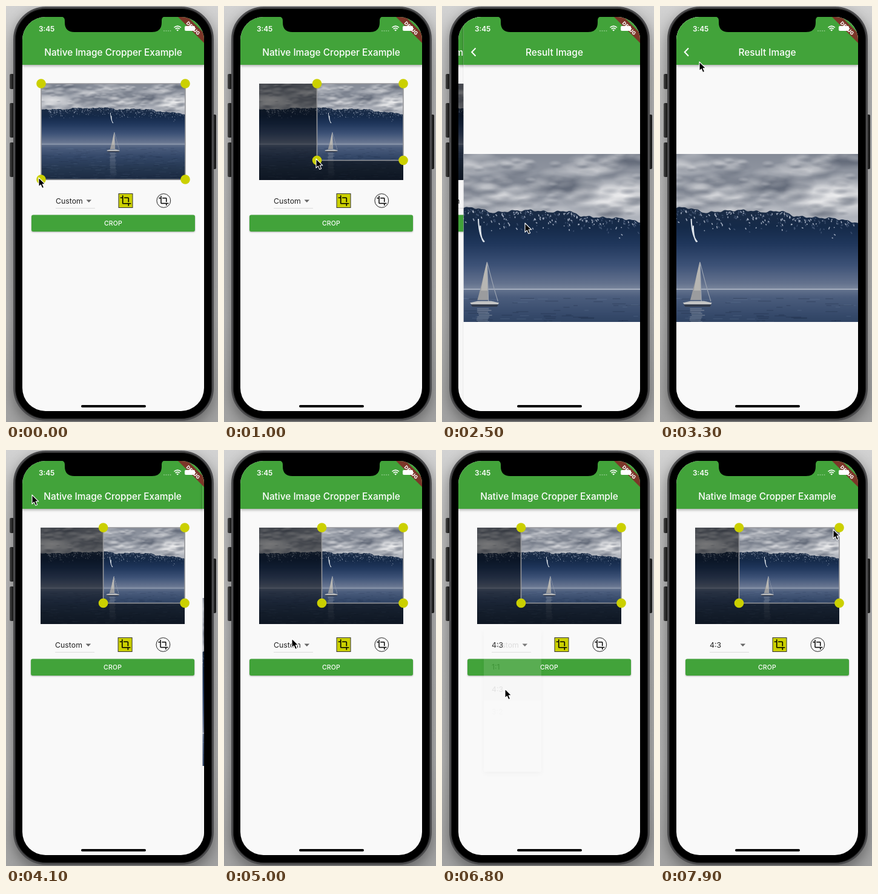
An HTML page with a canvas that plays this animation: 350x686 px, repeating every 8 s.

```html
<!DOCTYPE html>
<html lang="en">
<head>
<meta charset="utf-8">
<title>Image cropper demo</title>
<style>
html, body { margin: 0; width: 100%; height: 100%; overflow: hidden; background: #fff; }
#stage { position: relative; width: 350px; height: 686px; overflow: hidden; background: linear-gradient(#d2d2d2, #bebebe 18%, #b4b4b4 75%, #a2a2a2); }
svg, .layer { position: absolute; left: 0; top: 0; width: 350px; height: 686px; }
#body { position: absolute; box-sizing: border-box; left: 12px; top: 1px; width: 331px; height: 683px; border-radius: 54px; border: 3px solid #4b4b4d; background: #000; box-shadow: 0 8px 22px rgba(0,0,0,.4), inset 0 0 0 1px #222; }
.key { position: absolute; width: 7px; border-radius: 2px; background: linear-gradient(90deg, #555, #222 70%); }
#screen { clip-path: inset(18px 23px 18px 27px round 38px); background: #f9f9f9; }
canvas { position: absolute; }
#photo { left: 58px; top: 128px; width: 238px; height: 159px; }
#cropped { left: 27px; top: 244px; width: 300px; height: 277px; }
text { font-family: Inter, Roboto, sans-serif; font-size: 12.3px; fill: #222; }
.title { font-size: 15.4px; font-weight: 500; fill: #fff; text-anchor: middle; }
.bar { fill: #42a33a; filter: drop-shadow(0 2px 2px rgba(0,0,0,.3)); }
.edge { fill: #f9f9f9; filter: drop-shadow(0 0 2px rgba(0,0,0,.1)); }
</style>
</head>
<body>
<div id="stage">
  <div class="key" style="left:6px;top:112px;height:25px"></div>
  <div class="key" style="left:6px;top:160px;height:57px"></div>
  <div class="key" style="left:6px;top:225px;height:57px"></div>
  <div class="key" style="left:340px;top:179px;height:90px"></div>
  <div id="body"></div>

  <div id="screen" class="layer">
    <div id="home" class="layer">
      <canvas id="photo"></canvas>
      <svg viewBox="0 0 350 686">
        <rect class="bar" x="27" y="10" width="300" height="87"/>
        <text class="title" x="177" y="81.5">Native Image Cropper Example</text>
        <path id="shade" fill="#000" fill-opacity=".47" fill-rule="evenodd"/>
        <path id="frame" fill="none" stroke="#96979a" stroke-width="1.6"/>
        <g id="handles" fill="#cbd000"></g>
        <text id="ratio" x="82" y="325.5"></text>
        <path d="M132.5 319.5h8.6l-4.3 4.4z" fill="#666"/>
        <path d="M82 333.5h65" stroke="#dcdcdc"/>
        <rect x="186" y="309.5" width="23" height="23" fill="#cbd000" stroke="#333"/>
        <circle cx="260.3" cy="321" r="11.4" fill="none" stroke="#222"/>
        <path class="glyph" transform="translate(187.9 311.4) scale(.8)"/>
        <path class="glyph" transform="translate(251.6 312.3) scale(.73)"/>
        <rect x="42" y="344.5" width="270" height="27.5" rx="3" fill="#42a33a" style="filter:drop-shadow(0 1px 1px rgba(0,0,0,.3))"/>
        <text x="177" y="361.5" text-anchor="middle" style="font-size:10.5px;font-weight:500;fill:#fff;letter-spacing:.2px">CROP</text>
        <g id="menu">
          <rect id="sheet" x="69" width="95" rx="2" fill="#fafafa" style="filter:drop-shadow(0 3px 4px rgba(0,0,0,.28))"/>
          <rect id="hover" x="69" width="95" height="36.9" fill="#000" fill-opacity=".06"/>
          <g id="items"></g>
        </g>
      </svg>
    </div>
    <div id="result" class="layer">
      <svg viewBox="0 0 350 686">
        <rect class="edge" x="27" y="0" width="300" height="686"/>
        <rect class="bar" x="27" y="10" width="300" height="87"/>
        <text class="title" x="177" y="81.5">Result Image</text>
        <path d="M47 69.5l-6.3 6.5 6.3 6.5" fill="none" stroke="#fff" stroke-width="2"/>
      </svg>
      <canvas id="cropped"></canvas>
    </div>
    <svg viewBox="0 0 350 686">
      <path d="M284 18h16l27 27v16z" fill="#7c3629"/>
      <g fill="#fff">
        <text x="54" y="41.5" style="font-size:11.8px;font-weight:600;fill:#fff">3:45</text>
        <g fill-opacity=".4"><circle cx="261" cy="41" r=".9"/><circle cx="264.5" cy="41" r=".9"/><circle cx="268" cy="41" r=".9"/><circle cx="271.5" cy="41" r=".9"/></g>
        <path d="M277.5 35.5q5.7-4.8 11.4 0M279.6 37.8q3.6-3 7.2 0" fill="none" stroke="#fff" stroke-width="1.6"/>
        <path d="M283.2 41.6l-1.9-2.1q1.9-1.4 3.8 0z"/>
        <rect x="295" y="33" width="17" height="8" rx="2"/>
        <text transform="translate(309 36.5) rotate(45)" y="3" text-anchor="middle" style="font-size:8px;font-weight:800;fill:#fff">DEBUG</text>
      </g>
      <path d="M90 17h173q-6 1-6 7v3q0 16-16 16H113q-16 0-16-16v-3q0-6-7-7z"/>
      <rect x="124" y="658" width="107" height="4" rx="2"/>
    </svg>
  </div>
  <svg viewBox="0 0 350 686">
    <path id="cursor" d="M0 0V15L3.4 11.9 5.8 17.4 8.6 16.2 6.2 10.8H10.8Z" stroke="#fff" stroke-width="1.1" stroke-linejoin="round"/>
  </svg>
</div>
<script>
const LOOP = 8000;
const $ = id => document.getElementById(id);
const clamp = v => Math.max(0, Math.min(1, v));
const PHOTO = { left: 58, top: 128, right: 296, bottom: 287 };
const CUSTOM = { left: 161.5, bottom: 252.5 };
const FIXED = { left: 130.5, bottom: 252.5 };
const ITEMS = ['Custom', '1:1', '4:3', '3:2', '16:9', '9:16'];
const ROW = 36.9, ROW_TOP = 302.5;
const PUSH = 2165, POP = 3680, SLIDE = 500;
const OPEN = 5160, PICK = 6735, MENU = 300;

const CURSOR = [
  [0, 54, 283], [100, 54, 283], [1000, 152, 252], [1200, 160, 250], [1400, 160, 250],
  [1950, 137, 358], [2700, 137, 358], [3300, 65, 92], [3500, 43, 74], [4150, 43, 74],
  [4900, 112, 311], [5250, 112, 311], [6200, 104, 394], [7000, 104, 394], [7700, 286, 131]
];
const DRAG = [[100, 58, 286], [1000, 153.5, 254.5], [1200, CUSTOM.left, CUSTOM.bottom]];

function track(steps, t) {
  const next = steps.findIndex(s => s[0] > t);
  if (next === 0) return steps[0].slice(1);
  if (next < 0) return steps[steps.length - 1].slice(1);
  const a = steps[next - 1], b = steps[next];
  const u = (t - a[0]) / (b[0] - a[0]), e = u * u * (3 - 2 * u);
  return [1, 2].map(i => a[i] + (b[i] - a[i]) * e);
}

// cubic-bezier(.35, .91, .33, .97), solved by bisection
function slideEase(x) {
  const curve = (s, a, b) => 3 * s * (1 - s) ** 2 * a + 3 * s * s * (1 - s) * b + s ** 3;
  let lo = 0, hi = 1;
  for (let i = 0; i < 18; i++) {
    const mid = (lo + hi) / 2;
    if (curve(mid, .35, .33) < x) lo = mid; else hi = mid;
  }
  return curve(lo, .91, .97);
}

function paintPhoto(c) {
  let seed = 7;
  const rnd = () => (seed = seed * 16807 % 2147483647) / 2147483647;
  const shape = (fill, ...pts) => {
    c.fillStyle = fill;
    c.beginPath();
    pts.forEach(p => c.lineTo(p[0], p[1]));
    c.fill();
  };
  const fade = (y0, y1, ...stops) => {
    const g = c.createLinearGradient(0, y0, 0, y1);
    stops.forEach(([at, col]) => g.addColorStop(at, col));
    return g;
  };
  const puff = (x, y, rx, ry, rgb, a) => {
    c.save();
    c.translate(x, y);
    c.scale(rx, ry);
    const g = c.createRadialGradient(0, 0, 0, 0, 0, 1);
    g.addColorStop(0, `rgba(${rgb},${a})`);
    g.addColorStop(.5, `rgba(${rgb},${a * .6})`);
    g.addColorStop(1, `rgba(${rgb},0)`);
    c.fillStyle = g;
    c.fillRect(-1, -1, 2, 2);
    c.restore();
  };

  // sky: broad light and dark masses, then small billows
  c.fillStyle = fade(0, 55, [0, '#858b97'], [.5, '#9a9fa9'], [1, '#b9bdc5']);
  c.fillRect(0, 0, 238, 60);
  const white = '240,240,241', grey = '84,92,108';
  [[18, 27, 40, 12, white, .8], [222, 32, 46, 15, white, 1], [196, 11, 26, 6, white, .7],
   [112, 8, 26, 9, white, .5], [134, 31, 26, 9, white, .35], [74, 14, 30, 5, white, .5],
   [174, 22, 34, 9, grey, .8], [188, 27, 18, 6, grey, .6], [85, 28, 40, 9, grey, .5],
   [130, 20, 26, 6, grey, .5], [226, 4, 28, 8, grey, .7], [40, 6, 40, 8, grey, .45],
   [232, 34, 10, 5, grey, .5]
  ].forEach(p => puff(...p));
  for (let i = 0; i < 170; i++) {
    const x = rnd() * 238, y = rnd() * 44, r = 2.5 + rnd() * 5;
    puff(x, y, r * 1.6, r * .7, white, .26);
    puff(x + 1, y + r * .7, r * 1.7, r * .6, grey, .26);
  }

  // mountains
  const ridge = [[0, 42], [12, 43], [25, 42], [40, 43], [55, 40], [75, 41], [103, 39.5], [114, 40],
    [125, 43.5], [140, 42], [154, 41.5], [168, 43], [181, 42], [191, 46], [206, 47], [221, 47.6], [238, 51]];
  const ridgeY = x => {
    const i = Math.max(1, ridge.findIndex(p => p[0] >= x));
    const [a, b] = [ridge[i - 1], ridge[i]];
    return a[1] + (b[1] - a[1]) * (x - a[0]) / (b[0] - a[0]) + Math.sin(x * 1.3) * .25 + Math.sin(x * .57) * .5;
  };
  const line = [];
  for (let x = 0; x <= 238; x++) line.push([x, ridgeY(x)]);
  shape(fade(38, 101, [0, '#1c2c44'], [.25, '#152a49'], [.45, '#20375c'], [.7, '#3d5277'], [.92, '#65738f'], [1, '#7f8ba1']),
    ...line, [238, 101], [0, 101]);
  c.lineWidth = .7;
  for (let i = 0; i < 420; i++) {
    const x = 12 + rnd() ** 1.3 * 224, y = ridgeY(x) + .6 + rnd() * rnd() * 15;
    const dx = (rnd() - .35) * 2, dy = .4 + rnd() * 1.4;
    c.strokeStyle = rnd() < .45 ? 'rgba(205,214,228,.75)' : 'rgba(90,108,138,.55)';
    c.beginPath();
    c.moveTo(x, y);
    c.lineTo(x + dx, y + dy);
    c.stroke();
  }
  c.strokeStyle = '#dfe5ec';
  c.lineWidth = .9;
  c.beginPath();
  c.moveTo(114.5, 48);
  c.quadraticCurveTo(115, 61, 119, 65);
  c.moveTo(116, 53);
  c.quadraticCurveTo(116, 62, 118.5, 65);
  c.stroke();

  // lake
  c.fillStyle = fade(100, 159, [0, '#64738e'], [.1, '#4b5d7d'], [.35, '#334768'], [.7, '#24364f'], [1, '#1b2a42']);
  c.fillRect(0, 100, 238, 59);
  c.fillStyle = 'rgba(205,211,222,.7)';
  c.fillRect(0, 99.7, 238, .7);
  for (let i = 0; i < 260; i++) {
    const y = 106 + rnd() * 53;
    c.fillStyle = rnd() < .5 ? 'rgba(125,146,178,.17)' : 'rgba(10,20,40,.2)';
    c.fillRect(rnd() * 238, y, 3 + rnd() * 10, .6);
  }

  // boat and its reflection
  for (let y = 114; y < 157; y += 1.2) {
    c.fillStyle = `rgba(150,158,172,${.45 * (1 - (y - 114) / 46)})`;
    c.fillRect(113 + rnd() * 2, y, 8 + rnd() * 3, .9);
  }
  shape('#9b9c9e', [120.8, 79.5], [121.8, 108], [113.8, 108], [117.2, 95]);
  shape('#b7b6b3', [120.8, 79.5], [121.4, 101], [116.4, 101], [118.6, 89]);
  c.strokeStyle = '#9da5b2';
  c.lineWidth = .5;
  c.beginPath();
  c.moveTo(121, 80);
  c.quadraticCurveTo(125, 96, 129, 109);
  c.moveTo(121, 80);
  c.lineTo(122, 109);
  c.stroke();
  shape('#c3c4c4', [108.3, 110], [114, 108.8], [124, 108.8], [129.8, 110], [128.6, 112], [110, 112]);
  shape('#323b4c', [109, 111.2], [129.2, 111.2], [128.4, 113], [110, 113]);
}

function setupCanvas(id, w, h, zoom, x) {
  const el = $(id), c = el.getContext('2d');
  el.width = w * 2;
  el.height = h * 2;
  c.scale(2 * zoom, 2 * zoom);
  c.translate(-x, 0);
  paintPhoto(c);
}

function svgAdd(parent, tag, attrs, text = '') {
  const el = document.createElementNS('http://www.w3.org/2000/svg', tag);
  for (const k in attrs) el.setAttribute(k, attrs[k]);
  el.textContent = text;
  return parent.appendChild(el);
}

setupCanvas('photo', 238, 159, 1, 0);
setupCanvas('cropped', 300, 277, 300 / (PHOTO.right - CUSTOM.left), CUSTOM.left - PHOTO.left);
document.querySelectorAll('.glyph').forEach(g => g.setAttribute('d',
  'M17 15h2V7c0-1.1-.9-2-2-2H9v2h8v8zM7 17V1H5v4H1v2h4v10c0 1.1.9 2 2 2h10v4h2v-4h4v-2H7z'));
const handles = [0, 1, 2, 3].map(() => svgAdd($('handles'), 'circle', { r: 7.8 }));
const rows = ITEMS.map((name, i) => svgAdd($('items'), 'text', { x: 82, y: 325.5 + i * ROW }, name));

function drawCrop(t) {
  const [x, y] = t < PICK ? track(DRAG, t) : [FIXED.left, FIXED.bottom];
  const { left, top, right, bottom } = PHOTO;
  const box = `M${x} ${top}H${right}V${y}H${x}Z`;
  $('shade').setAttribute('d', `M${left} ${top}H${right}V${bottom}H${left}Z${box}`);
  $('frame').setAttribute('d', box);
  [[x, top], [right, top], [x, y], [right, y]].forEach(([cx, cy], i) => {
    handles[i].setAttribute('cx', cx);
    handles[i].setAttribute('cy', cy);
  });
  $('ratio').textContent = t < PICK ? 'Custom' : '4:3';
}

function drawPages(t) {
  const shown = slideEase(clamp((t - PUSH) / SLIDE)) - slideEase(clamp((t - POP) / SLIDE));
  $('home').style.transform = `translateX(${-100 * shown}px)`;
  $('result').style.transform = `translateX(${300 * (1 - shown)}px)`;
  $('result').style.visibility = shown > .001 ? 'visible' : 'hidden';
}

function drawMenu(t, cursorY) {
  const closing = t >= PICK;
  const p = closing ? 1 - clamp((t - PICK) / MENU) : clamp((t - OPEN) / MENU);
  $('menu').setAttribute('opacity', closing ? clamp((p - .75) * 4) : clamp(p * 4));
  const full = ROW * ITEMS.length + 13;
  const grow = clamp((p - .25) * 4);
  $('sheet').setAttribute('y', 296);
  $('sheet').setAttribute('height', 50 + (full - 50) * grow);
  const over = Math.max(0, Math.floor((cursorY - ROW_TOP) / ROW));
  $('hover').setAttribute('y', ROW_TOP + Math.min(over, ITEMS.length - 1) * ROW);
  const unit = .5 / (ITEMS.length + 1.5);
  rows.forEach((row, i) => {
    const start = .5 + (i + 1) * unit;
    row.setAttribute('opacity', i ? clamp((p - start) / (1.5 * unit)) : 1);
  });
}

function render(t) {
  const [x, y] = track(CURSOR, t);
  drawCrop(t);
  drawPages(t);
  drawMenu(t, y);
  $('cursor').setAttribute('transform', `translate(${x} ${y})`);
}

const began = performance.now();
function tick() {
  render((performance.now() - began) % LOOP);
  requestAnimationFrame(tick);
}
tick();
</script>
</body>
</html>
```
